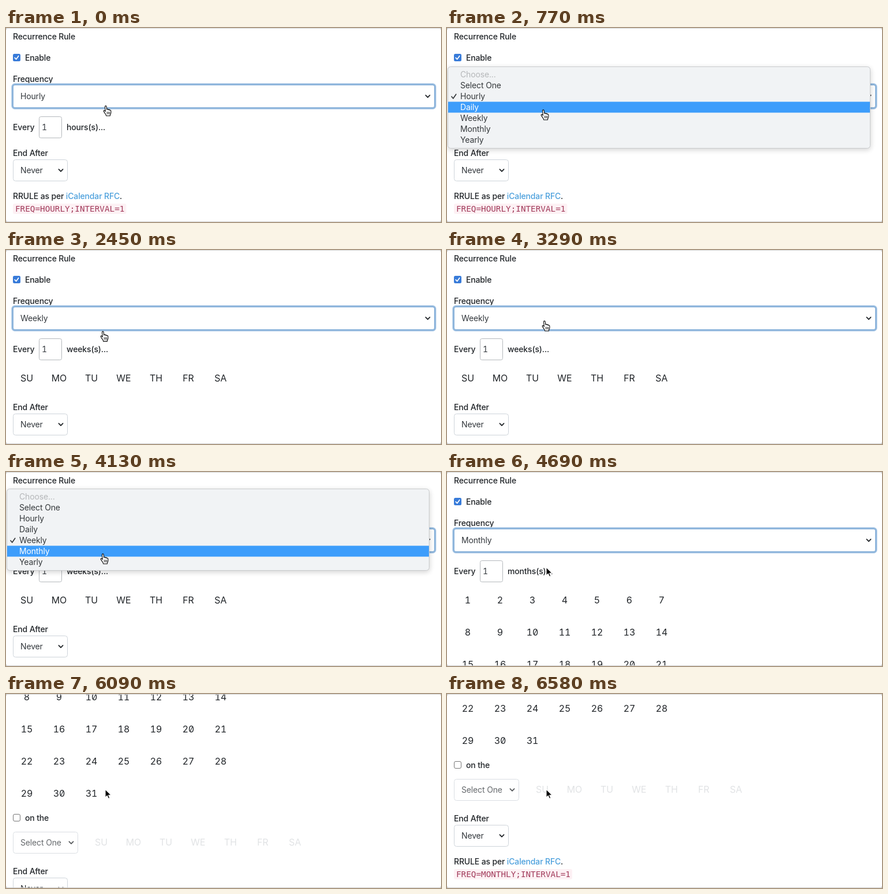
Write an HTML page that moves like this. It is 754 px wide and 338 px high and loops after 6.65 s.

```html
<!DOCTYPE html>
<html lang="en">
<head>
<meta charset="utf-8">
<title>Recurrence Rule</title>
<style>
html, body { margin: 0; width: 100%; height: 100%; overflow: hidden; background: #fff; }
svg { display: block; width: 754px; height: 338px; }
text { font: 400 14px Inter, "Open Sans", sans-serif; letter-spacing: -.011em; fill: #32373c; white-space: pre; }
.label { font-weight: 500; fill: #212529; }
.cell { font-size: 16px; letter-spacing: 0; fill: #212529; text-anchor: middle; font-feature-settings: "tnum", "zero"; }
.num { font-feature-settings: "tnum", "zero"; }
.off { fill: #e1e3e5; }
.code { font: 14.3px "DejaVu Sans Mono", monospace; letter-spacing: 0; fill: #a23c5c; }
.shadow { fill: #000; opacity: .16; filter: blur(4px); }
</style>
</head>
<body>
<svg id="stage" viewBox="0 0 754 338"></svg>
<script>
const LOOP = 6650, STEP = 70;
const stage = document.getElementById('stage');
const DAYS = ['SU', 'MO', 'TU', 'WE', 'TH', 'FR', 'SA'];
const OPTIONS = ['Choose...', 'Select One', 'Hourly', 'Daily', 'Weekly', 'Monthly', 'Yearly'];
const UNITS = { Hourly: 'hours', Daily: 'days', Weekly: 'weeks', Monthly: 'months' };
const HOURLY = 2;

// One entry per visit to the menu; the last part of each is a fade.
const MENUS = [
  { open: 350, close: 1050, checked: 2 },
  { open: 1680, close: 2450, checked: 3 },
  { open: 3570, close: 4410, checked: 4 }
];
const FADE = 140;
const CLICKS = [280, 840, 1610, 2240, 3500, 4200], CLICK_TIME = 210;

// time, x, y of the pointer tip
const PATH = [
  [0, 173, 136], [280, 170, 125], [420, 170, 125], [770, 167, 143], [1050, 167, 143],
  [1400, 169, 124], [1750, 169, 124], [2100, 168, 143], [2380, 168, 143], [2730, 168, 134],
  [2870, 168, 134], [3290, 169, 124], [3710, 169, 124], [4130, 168, 143], [4340, 168, 143],
  [4690, 172, 166], [LOOP, 172, 166]
];

const clamp = p => Math.max(0, Math.min(1, p));
const smooth = p => p * p * (3 - 2 * p);
const inOut = p => p < .5 ? 4 * p ** 3 : 1 - 4 * (1 - p) ** 3;

function pointerAt(t) {
  const i = PATH.findIndex(k => k[0] > t);
  const [t0, x0, y0] = PATH[i - 1], [t1, x1, y1] = PATH[i];
  const p = smooth((t - t0) / (t1 - t0));
  return [x0 + (x1 - x0) * p, y0 + (y1 - y0) * p];
}

function scrollAt(t) {
  const flick = 1 - (1 - clamp((t - 4900) / 950)) ** 3;
  return Math.round(263 * flick + 103 * inOut(clamp((t - 5880) / 700)));
}

const text = (x, y, s, cls = '') => `<text x="${x}" y="${y}" class="${cls}">${s}</text>`;
const rect = (x, y, w, h, r, attrs) => `<rect x="${x}" y="${y}" width="${w}" height="${h}" rx="${r}" ${attrs}/>`;
const line = (d, color, w) => `<path d="${d}" fill="none" stroke="${color}" stroke-width="${w}" stroke-linecap="round" stroke-linejoin="round"/>`;
const chevron = (x, y) => line(`M${x - 3.6} ${y - 1.8}l3.6 3.6 3.6-3.6`, '#212529', 1.8);

function checkbox(y, on) {
  return on
    ? rect(12, y, 13, 13, 2.5, 'fill="#387bd9"') + line(`M15.2 ${y + 6.9}l2.4 2.6 4.1-5.8`, '#fff', 1.7)
    : rect(12.5, y + .5, 12, 12, 2.5, 'fill="#fff" stroke="#767676"');
}

function select(y, w, label, cls) {
  return rect(12.5, y + .5, w - 1, 37, 4, 'fill="#fff" stroke="#ced4da"') +
    text(25, y + 24, label, cls) + chevron(w, y + 19);
}

const dayRow = (x, y, cls) => DAYS.map((d, i) => text(x + 56 * i, y, d, 'cell ' + cls)).join('');

function monthGrid() {
  let s = '';
  for (let n = 0; n < 31; n++) s += text(36 + 56 * (n % 7), 229 + 56 * Math.floor(n / 7), n + 1, 'cell');
  return s + checkbox(483, false) + text(33, 495, 'on the', 'label') +
    `<g opacity=".75">${select(514, 113, 'Select One')}</g>` + dayRow(165, 538, 'off');
}

function form(freq) {
  const shift = freq === 'Weekly' ? 56 : freq === 'Monthly' ? 365 : 0;
  const rule = `FREQ=${freq.toUpperCase()};INTERVAL=1`;
  return text(12, 20, 'Recurrence Rule', 'label') +
    checkbox(45, true) + text(33, 57, 'Enable', 'label') +
    text(12, 94, 'Frequency', 'label') +
    rect(11.5, 98.5, 732, 41, 4, 'fill="none" stroke="#c9dcf0" stroke-width="5"') +
    rect(11.5, 98.5, 732, 41, 4, 'fill="#fff" stroke="#8fb6dc" stroke-width="3"') +
    text(25, 124, freq) + chevron(731, 119) +
    text(12, 178, 'Every', 'label') +
    rect(57.5, 154.5, 39, 37, 3, 'fill="#fff" stroke="#b4b8bc"') + text(62, 178, '1', 'num') +
    text(105, 178, UNITS[freq] + '(s)...', 'label') +
    (freq === 'Weekly' ? dayRow(36, 229, '') : freq === 'Monthly' ? monthGrid() : '') +
    `<g transform="translate(0 ${shift})">` +
    text(12, 223, 'End After', 'label') + select(229, 95, 'Never') +
    text(12, 298, 'RRULE as per <tspan fill="#4a9fdc">iCalendar RFC</tspan>.', 'label') +
    rect(12, 306, rule.length * 8.61 + 7, 18, 3, 'fill="#fdf1f4"') + text(16, 320, rule, 'code') + '</g>';
}

function menuView(menu, t, y) {
  const top = 119 - 19 * menu.checked - 14, alpha = clamp((menu.close - t) / FADE);
  const hover = menu.checked + Math.round((y - 5 - 119) / 19);
  let s = rect(0, top + 2, 735, 144, 7, 'class="shadow"') +
    rect(1.5, top + .5, 732, 142, 5, 'fill="#f1f3f5" stroke="#c9cbcd"');
  OPTIONS.forEach((name, i) => {
    const mid = 119 + 19 * (i - menu.checked), lit = i === hover;
    const ink = i === 0 ? '#b5b7b9' : lit ? '#fff' : '#34383b';
    if (lit) s += rect(2, mid - 9.5, 731, 19, 0, 'fill="#3d9dfb"');
    s += `<text x="23" y="${mid + 5}" style="fill:${ink}">${name}</text>`;
    if (i === menu.checked) s += line(`M8 ${mid + .5}l2.7 3.3 5-7.3`, ink, 1.7);
  });
  return `<g opacity="${alpha}">${s}</g>`;
}

const HAND = 'M-1.6 1.3C-1.6-.8 1.2-.8 1.4 1.2L2 6C2.6 4.9 4.7 5 4.9 6.6 5.7 5.7 7.5 6 7.6 7.3 8.5 6.7 9.9 7.2 9.9 8.7V11.6C9.9 13.4 8.4 14.2 8.2 17H.8C.5 14.6-1.2 13.5-2.2 11.8L-4 9.4C-4.9 7.9-3.1 6.9-2 8L-.8 9.4Z';
const ARROW = 'M0 0V14.4L3.3 11.3 5.6 16.4 8 15.4 5.8 10.3H10.4Z';

function pointer(x, y, arrow) {
  const shape = arrow
    ? `<path d="${ARROW}" fill="#000" stroke="#fff" stroke-width="1.2"/>`
    : `<g transform="scale(.9 1)"><path d="${HAND}" fill="#fff" stroke="#000" stroke-width="1.2" stroke-linejoin="round"/>` +
      line('M2.6 10.3v3.6M5 10.3v3.6M7.3 10.3v3.6', '#000', .9) + '</g>';
  return `<g transform="translate(${x.toFixed(1)} ${y.toFixed(1)})">${shape}</g>`;
}

const frame = '<path d="M0 0H754V338H0ZM0 4V334Q0 338 4 338H750Q754 338 754 334V4Q754 0 750 0H4Q0 0 0 4Z" fill="#8f9192" fill-rule="evenodd"/>' +
  rect(0, 0, 754, 1, 0, 'fill="#d4d5d6"') + rect(0, 337, 754, 1, 0, 'fill="#d0d1d2"');

function draw(t) {
  const [x, y] = pointerAt(t);
  const picked = MENUS.filter(m => t >= m.close - FADE).length;
  const menu = MENUS.find(m => t >= m.open && t < m.close);
  const click = CLICKS.some(c => t >= c && t < c + CLICK_TIME);
  stage.innerHTML = `<g transform="translate(0 ${-scrollAt(t)})">${form(OPTIONS[HOURLY + picked])}</g>` + frame +
    (menu ? menuView(menu, t, y) : '') +
    (click ? `<circle cx="${x}" cy="${y}" r="30.5" fill="none" stroke="#111" stroke-width="1.6"/>` : '') +
    pointer(x, y, !menu && y > 143);
}

let last = -1;
function tick() {
  const t = Math.floor(performance.now() % LOOP / STEP) * STEP;
  if (t !== last) draw(last = t);
  requestAnimationFrame(tick);
}
tick();
</script>
</body>
</html>
```
